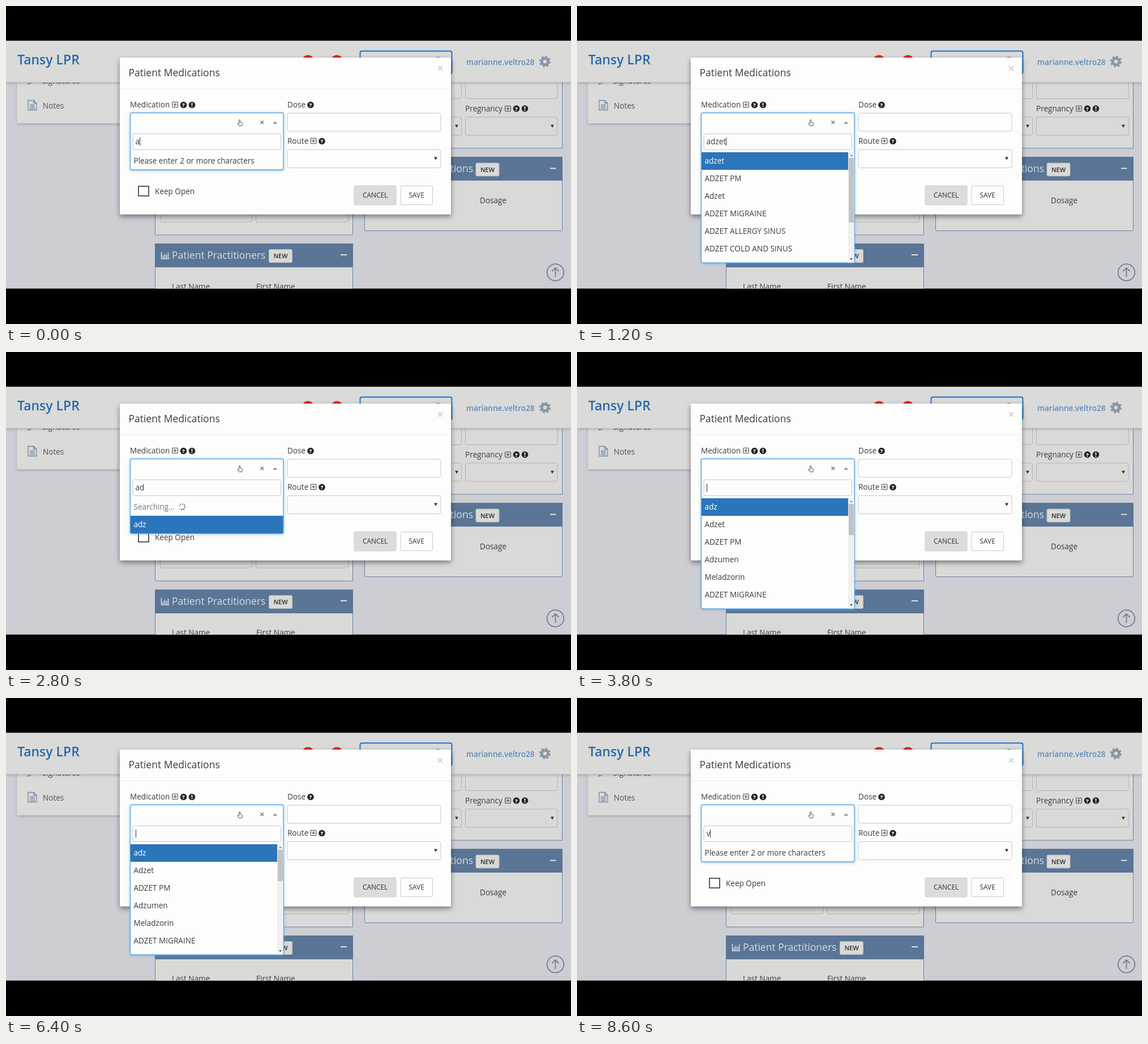
Recreate the animation shown at these times as an HTML page. Size 998 by 561 pixels, loop 8800 ms.

```html
<!DOCTYPE html>
<html lang="en">
<head>
<meta charset="utf-8">
<title>Patient Medications</title>
<style>
  html, body { margin: 0; width: 100%; height: 100%; overflow: hidden; background: #000; }
  svg { display: block; width: 100%; height: 100%; }
  text { font: 13.55px "Open Sans", "Noto Sans", sans-serif; fill: #3c3c3c; white-space: pre; }
  .big { font-size: 17.5px; }
  .btn { font-size: 11.9px; font-weight: 500; fill: #333; }
  .new { font-size: 11px; font-weight: 600; fill: #2d2d2d; text-anchor: middle; }
  .brand { font-size: 23px; font-weight: 600; fill: #2869a9; }
  .user { font-weight: 600; fill: #5f8bbb; }
  .dim { fill: #4e5257; }
  .pale { fill: #d5dce3; }
  .mark { font-size: 9.5px; font-weight: 800; fill: #fdfdfc; text-anchor: middle; }
  .panel { fill: #d9d9d7; stroke: #6683a5; }
  .bar { fill: #5a7595; }
  .well { fill: #d9d9d7; stroke: #b1b3b6; }
  .field { fill: #fdfdfc; stroke: #c4c6c8; }
  .pick { fill: #2b75bb; }
  .lit { fill: #fff; }
  .wait { fill: #777; }
</style>
</head>
<body>
<svg viewBox="0 0 998 561" preserveAspectRatio="none">
  <defs>
    <g id="plus">
      <rect x="-4.8" y="-4.8" width="9.6" height="9.6" rx="1.2" fill="none" stroke="#444" stroke-width="1.1"/>
      <path d="M-3 0H3M0-3V3" stroke="#444" stroke-width="1.2"/>
    </g>
    <g id="help"><circle r="5.8" fill="#222"/><text class="mark" y="3.5">?</text></g>
    <g id="alert"><circle r="5.8" fill="#222"/><path d="M0-3.8V.8M0 2V3.8" stroke="#fdfdfc" stroke-width="1.9"/></g>
    <g id="new">
      <rect x="-20.5" y="-11.5" width="41" height="23" rx="2" fill="#d9d9d7" stroke="#b9bbbd"/>
      <text class="new" y="4.2">NEW</text>
    </g>
    <path id="down" d="M-3-2.6H3L0 2.8Z" fill="#333"/>
    <filter id="soft" x="-10%" y="-15%" width="120%" height="135%">
      <feDropShadow dx="0" dy="4" stdDeviation="5" flood-opacity=".45"/>
    </filter>
    <filter id="faint" x="-10%" y="-20%" width="120%" height="150%">
      <feDropShadow dx="0" dy="2" stdDeviation="2" flood-opacity=".2"/>
    </filter>
    <filter id="glow" x="-10%" y="-20%" width="120%" height="150%">
      <feDropShadow dx="0" dy="1" stdDeviation="2.5" flood-color="#4a9be0" flood-opacity=".55"/>
    </filter>
    <clipPath id="stage"><rect y="61.5" width="998" height="437"/></clipPath>
  </defs>

  <rect width="998" height="561"/>
  <g clip-path="url(#stage)">
    <rect y="61" width="998" height="438" fill="#cdced4"/>

    <!-- side menu -->
    <rect x="19.5" y="110" width="225" height="97" rx="2" fill="#dadad8" filter="url(#faint)"/>
    <path d="M39 138l1-4 7-7 3 3-7 7z" fill="none" stroke="#7c8da0" stroke-width="1.3"/>
    <text class="dim" x="64" y="137">Signatures</text>
    <path d="M39 166.500H49L54 171.500V183.500H39ZM49 166.500V171.500H54M42 174.500H51M42 177.500H51M42 180.500H51" fill="none" stroke="#7488a0" stroke-width="1.3"/>
    <text class="dim" x="65" y="180.500">Notes</text>

    <!-- page panels -->
    <rect class="panel" x="263.500" y="300" width="349" height="104" rx="1"/>
    <rect class="well" x="272.500" y="350" width="162" height="31" rx="3"/>
    <rect class="well" x="441.500" y="350" width="163" height="31" rx="3"/>
    <rect class="panel" x="263.500" y="419.500" width="349" height="90"/>
    <rect class="bar" x="263" y="419" width="350" height="42"/>
    <path d="M274.500 434V446H288.500M277.500 445V440M280.500 445V437M283.500 445V439M286.500 445V435" fill="none" stroke="#d5dce3" stroke-width="1.7"/>
    <text class="big pale" x="293" y="445.500">Patient Practitioners</text>
    <use href="#new" x="485" y="441"/>
    <path d="M591 439H602" stroke="#dde3e8" stroke-width="2"/>
    <text x="293" y="500">Last Name</text>
    <text x="442" y="500">First Name</text>

    <rect class="panel" x="633.500" y="100" width="349" height="151"/>
    <rect class="well" x="641.500" y="125" width="163" height="38.500" rx="3"/>
    <rect class="well" x="811.500" y="125" width="162.500" height="38.500" rx="3"/>
    <rect class="well" x="641.500" y="196" width="163" height="32" rx="3"/>
    <rect class="well" x="811.500" y="196" width="162.500" height="32" rx="3"/>
    <use href="#down" x="796" y="212"/>
    <use href="#down" x="965" y="212"/>
    <text x="811" y="186">Pregnancy</text>
    <use href="#plus" x="886.500" y="181"/>
    <use href="#help" x="901.500" y="181"/>
    <use href="#alert" x="916.500" y="181"/>

    <rect class="panel" x="633.500" y="266.500" width="349" height="130" rx="1"/>
    <rect class="bar" x="633" y="266" width="350" height="42"/>
    <text class="big pale" x="825" y="293" text-anchor="end">Medications</text>
    <use href="#new" x="850.500" y="288.500"/>
    <path d="M961 286.500H971.500" stroke="#dde3e8" stroke-width="2"/>
    <text x="837" y="347.500">Dosage</text>

    <g fill="none" stroke="#71808f" stroke-width="1.8">
      <circle cx="970.500" cy="470" r="14.800"/>
      <path d="M970.500 478V462M964.500 468L970.500 462L976.500 468"/>
    </g>

    <!-- top bar -->
    <rect y="61" width="998" height="73.500" fill="#dadad8" filter="url(#faint)"/>
    <path d="M0 134.500H998" stroke="#bfc0c4"/>
    <text class="brand" x="20" y="103">Tansy LPR</text>
    <circle cx="533.500" cy="97" r="10.500" fill="#e2240f"/>
    <circle cx="584.500" cy="97" r="10.500" fill="#e2240f"/>
    <rect x="625.500" y="79.500" width="162" height="39.500" rx="3" fill="#dadad8" stroke="#1873d3" stroke-width="2"/>
    <circle cx="763" cy="96" r="5.500" fill="none" stroke="#5f8bbb" stroke-width="1.800"/>
    <text class="user" x="813" y="104">marianne.veltro28</text>
    <g fill="none" stroke="#8796a5">
      <circle cx="952" cy="98" r="5.600" stroke-width="4.600"/>
      <circle cx="952" cy="98" r="8.800" stroke-width="2.600" stroke-dasharray="3.900 3.011"/>
    </g>

    <!-- dialog -->
    <rect x="201" y="91" width="585" height="276.500" rx="2" fill="#fdfdfc" filter="url(#soft)"/>
    <path d="M201 146H786" stroke="#ebebea"/>
    <text class="big" x="216.500" y="124">Patient Medications</text>
    <path d="M763 106L771 114M771 106L763 114" stroke="#c6c6c6" stroke-width="1.500"/>

    <text x="219" y="179">Medication</text>
    <use href="#plus" x="298.500" y="174"/>
    <use href="#help" x="313.500" y="174.500"/>
    <use href="#alert" x="328.500" y="174.500"/>
    <text x="497" y="179">Dose</text>
    <use href="#help" x="538" y="174.500"/>
    <rect class="field" x="497" y="189" width="271" height="32" rx="3"/>
    <text x="497" y="243">Route</text>
    <use href="#plus" x="543" y="238"/>
    <use href="#help" x="558" y="238.500"/>
    <rect class="field" x="497" y="253.500" width="271" height="32" rx="3"/>
    <use href="#down" x="759" y="269"/>

    <rect x="234" y="318" width="18" height="17" fill="#fdfdfc" stroke="#4a4a4a" stroke-width="1.800"/>
    <text x="263" y="331.500">Keep Open</text>
    <rect x="615" y="317" width="74" height="34" rx="2" fill="#dcdcdb" stroke="#cfcfcf"/>
    <text class="btn" x="630" y="338">CANCEL</text>
    <rect x="697" y="317.500" width="56.500" height="33" rx="2" fill="#fdfdfc" stroke="#c8c8c8"/>
    <text class="btn" x="711.500" y="338">SAVE</text>

    <!-- open select -->
    <rect id="frame" x="219.500" y="188.500" width="270.500" height="100" rx="3" fill="#fdfdfc" stroke="#5fa8e4" stroke-width="1.400" filter="url(#glow)"/>
    <path d="M449.500 202.500L455 208M455 202.500L449.500 208" stroke="#777" stroke-width="1.500"/>
    <path d="M471 207.500H479.500L475.200 203.800Z" fill="#888"/>
    <path d="M411.500 211.500L408.800 207.800Q409.200 206 411 207.500L411.600 208V201Q412.600 199.500 413.600 201V205L416.500 205.800Q418 206.300 417.500 208L416.600 211.500Z" fill="#fdfdfc" stroke="#555" stroke-width="1"/>
    <rect class="field" x="224" y="225.500" width="261.500" height="28" rx="3"/>
    <text id="typed" x="228.500" y="244"></text>
    <path id="caret" d="M.5 232V246.500" stroke="#333"/>
    <g id="drop"></g>
    <g id="spin" fill="#666"></g>
  </g>
</svg>
<script>
const $ = id => document.getElementById(id);
const LOOP = 8800, BLINK = 450, TOP = 258, ROW = 30.9;

const lists = {
  adzet: { thumb: 114, rows: ['adzet', 'ADZET PM', 'Adzet', 'ADZET MIGRAINE', 'ADZET ALLERGY SINUS', 'ADZET COLD AND SINUS'] },
  adz: { thumb: 55, rows: ['adz', 'Adzet', 'ADZET PM', 'Adzumen', 'Meladzorin', 'ADZET MIGRAINE'] }
};

// start time, typed text, view, query, caret hidden
const steps = [
  [0, 'a', 'hint'],
  [200, 'ad', 'search', 'ad'],
  [400, 'adz', 'search', 'adz'],
  [600, 'adze', 'search', 'adze'],
  [800, 'adzet', 'search', 'adzet'],
  [1200, 'adzet', 'list', 'adzet'],
  [2400, 'adze', 'search', 'adze'],
  [2600, 'adz', 'search', 'adz'],
  [2800, 'ad', 'search', 'adz', true],
  [3000, 'a', 'hint'],
  [3200, '', 'hint'],
  [3400, '', 'list', 'adz'],
  [6600, 'v', 'hint'],
  [6800, 'vy', 'search', 'vy'],
  [7000, 'vyv', 'search', 'vyv'],
  [8400, 'vy', 'search', 'vy'],
  [8600, 'v', 'hint']
];

const label = (i, str, cls = '') =>
  `<text class="${cls}" x="225.500" y="${TOP + ROW * i + 20}">${str}</text>`;
const pick = (i, w) =>
  `<rect class="pick" x="220" y="${TOP + ROW * i}" width="${w}" height="31"/>`;

const views = {
  hint: () => [289, label(0, 'Please enter 2 or more characters')],
  search: q => [320, label(0, 'Searching...', 'wait') + pick(1, 269.5) + label(1, q, 'lit')],
  list: q => {
    const { rows, thumb } = lists[q];
    return [453, pick(0, 259)
      + rows.map((r, i) => label(i, r, i ? '' : 'lit')).join('')
      + '<rect x="479" y="258" width="10.500" height="194.500" fill="#f0f0f0"/>'
      + `<rect x="480" y="268" width="9" height="${thumb}" fill="#c3c3c3"/>`
      + '<path d="M482 265H487L484.500 262Z" fill="#8a8a8a"/>'
      + '<path d="M482 445H487L484.500 448Z" fill="#444"/>'];
  }
};

$('spin').innerHTML = Array.from({ length: 8 }, (_, i) => {
  const a = i * Math.PI / 4;
  return `<circle cx="${5 * Math.cos(a)}" cy="${5 * Math.sin(a)}" r="${0.75 + i * 0.1}"/>`;
}).join('');

let shown, caretX;

function enter(step) {
  const [, typed, view, query] = step;
  const [bottom, body] = views[view](query);
  $('typed').textContent = typed;
  $('drop').innerHTML = body;
  $('frame').setAttribute('height', bottom - 188.5);
  $('spin').style.display = view === 'search' ? '' : 'none';
  caretX = 229 + (typed ? Math.round($('typed').getComputedTextLength()) - 1 : 0);
  $('caret').setAttribute('transform', `translate(${caretX} 0)`);
  shown = step;
}

function draw() {
  const t = performance.now() % LOOP;
  const step = steps.findLast(s => s[0] <= t);
  if (step !== shown) enter(step);
  const on = !step[4] && Math.floor((t - step[0]) / BLINK) % 2 === 0;
  $('caret').style.display = on ? '' : 'none';
  $('spin').setAttribute('transform', `translate(311 273) rotate(${t * 0.18})`);
  requestAnimationFrame(draw);
}
draw();
</script>
</body>
</html>
```
